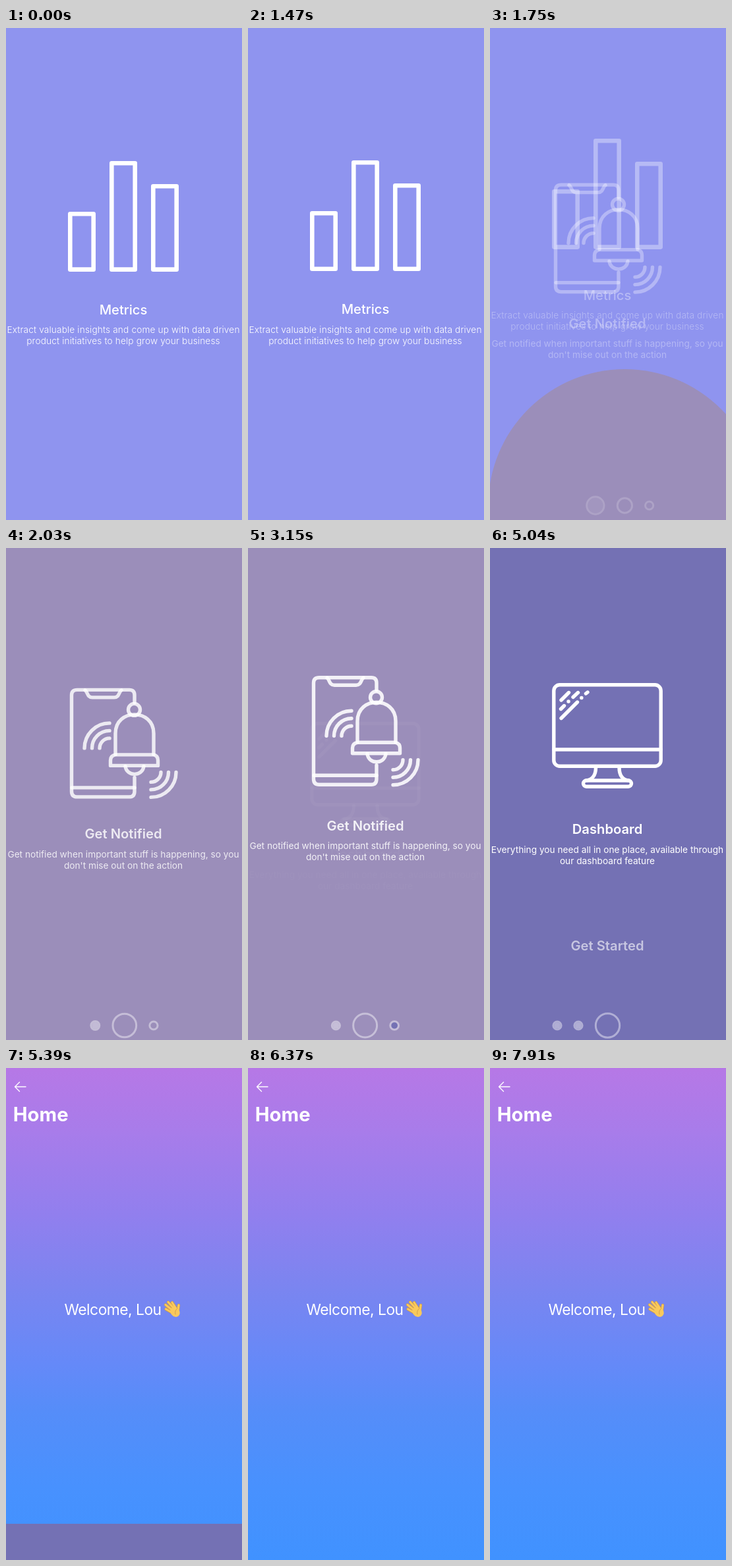
These frames come from a looping animation (358 by 747 pixels, 8000 ms). An HTML page with a canvas:

```html
<!DOCTYPE html>
<html lang="en">
<head>
<meta charset="utf-8">
<title>Onboarding</title>
<style>
html, body { margin: 0; width: 100%; height: 100%; overflow: hidden; background: #8f94ef; }
canvas { display: block; width: 100vw; height: 100vh; }
</style>
</head>
<body>
<canvas id="stage"></canvas>
<script>
const W = 358, H = 747, LOOP = 8000, CX = 178;
const canvas = document.getElementById('stage');
const ctx = canvas.getContext('2d');
const dpr = window.devicePixelRatio || 1;
canvas.width = W * dpr;
canvas.height = H * dpr;

const clamp = v => Math.max(0, Math.min(1, v));
const easeOut = u => 1 - Math.pow(1 - clamp(u), 1.68);
const smooth = u => { u = clamp(u); return u * u * (3 - 2 * u); };

const ENTER = 850, FADE_IN = 650, EXIT = 425, FILL = 500, SLIDE = 620;
const BUTTON_PRESS = 5040, DISMISS = 5145;

const pages = [
  { start: -780, bg: '#8f94ef', icon: drawBars, title: 'Metrics', titleWeight: 500, bodyWeight: 300, spacing: '0.13px',
    body: ['Extract valuable insights and come up with data driven', 'product initiatives to help grow your business'] },
  { start: 1475, bg: '#9b8eba', icon: drawPhone, title: 'Get Notified', titleWeight: 600, bodyWeight: 400, spacing: '0px',
    body: ['Get notified when important stuff is happening, so you', "don't mise out on the action"] },
  { start: 3100, bg: '#7471b4', icon: drawMonitor, title: 'Dashboard', titleWeight: 600, bodyWeight: 400, spacing: '0px',
    body: ['Everything you need all in one place, available through', 'our dashboard feature'] }
];

function text(str, x, y, size, weight, align = 'center', spacing = '0px') {
  ctx.font = `${weight} ${size}px Inter, Roboto, sans-serif`;
  ctx.letterSpacing = spacing;
  ctx.textAlign = align;
  ctx.fillStyle = '#fff';
  ctx.fillText(str, x, y);
}

function pen(width, color = '#fff') {
  ctx.strokeStyle = color;
  ctx.lineWidth = width;
  ctx.lineCap = ctx.lineJoin = 'round';
}

const path = d => ctx.stroke(new Path2D(d));

function circle(x, y, r) {
  ctx.beginPath();
  ctx.arc(x, y, r, 0, Math.PI * 2);
}

function box(x, y, w, h, r) {
  ctx.beginPath();
  ctx.roundRect(x, y, w, h, r);
  ctx.stroke();
}

function drawBars() {
  pen(6.6);
  [[94, 278], [157, 201], [220, 236]].forEach(([x, top]) =>
    ctx.strokeRect(x + 3.3, top + 3.3, 35.4, 369 - top - 6.6));
}

function waves(x, y, from) {
  [38, 26.5, 15].forEach(r => {
    ctx.beginPath();
    ctx.arc(x, y, r, from, from + Math.PI / 2);
    ctx.stroke();
  });
}

function drawPhone() {
  ctx.translate(0, 8.5);
  pen(5.4);
  path('M195 215V204Q195 196 187 196H108Q99.500 196 99.500 204V350Q99.500 358.500 108 358.500H187Q195 358.500 195 350V329');
  path('M100 344.500H195');
  path('M120 196.500C124 199 123 207.500 131 207.500H164C172 207.500 171 199 175 196.500');
  waves(157, 284.5, Math.PI);
  waves(220, 321, 0);
  circle(194.5, 226, 9);
  ctx.stroke();
  path('M166 294V262C166 224 224 224 224 262V294');
  path('M166 294.500H224Q230.500 296 230.500 303V311H158.500V303Q158.500 296 166 294.500Z');
  path('M181 312C183 328 207 328 209 312');
}

function drawMonitor() {
  ctx.translate(0, -12);
  pen(5.4);
  box(96.8, 219.8, 162.4, 123.4, 9);
  path('M97 318H259');
  path('M160.500 345C160.500 357 155 364 146 365M196 345C196 357 201 364 210 365');
  box(141.5, 365, 73, 9.2, 4.6);
  path('M108 243L119.500 231.500M107.500 256.500L112.500 251.500M119 245h.1M126 238.500L133.500 231.500');
  path('M108 270.500L132.500 246M138.800 239.500h.1M145.500 233L148 231');
}

function drawPage(p, t, next) {
  const enter = easeOut((t - p.start) / ENTER);
  const leaving = next ? clamp((t - next.start) / EXIT) : 0;
  const alpha = Math.pow(clamp((t - p.start) / FADE_IN), 1.3) * (1 - leaving);
  if (alpha <= 0) return;
  const dy = 65 * (1 - enter) - 40 * easeOut(leaving);
  ctx.save();
  ctx.globalAlpha = alpha;
  ctx.save();
  ctx.translate(0, dy);
  p.icon();
  ctx.restore();
  ctx.translate(0, dy * 0.65);
  text(p.title, CX, 434.3, 20.2, p.titleWeight);
  p.body.forEach((line, i) => text(line, CX, 462.5 + i * 17, 13.7, p.bodyWeight, 'center', p.spacing));
  ctx.restore();
}

// Pager: the active item grows to a large ring and stays centred.
function pagerLayout(pos) {
  const active = pages.map((_, i) => Math.max(0, 1 - Math.abs(i - pos)));
  const xs = [0];
  for (let i = 1; i < pages.length; i++) xs[i] = xs[i - 1] + 32 + 12.5 * (active[i - 1] + active[i]);
  const centre = xs.reduce((sum, x, i) => sum + x * active[i], 0);
  return xs.map((x, i) => ({ x: 178.5 + x - centre, a: active[i] }));
}

function drawPager(pos, items) {
  ctx.save();
  items.forEach(({ x, a }, i) => {
    ctx.globalAlpha = 0.43 * clamp(pos);
    pen(3);
    circle(x, 725, 6.1 + 12.1 * a);
    ctx.stroke();
    ctx.globalAlpha *= clamp(pos - i);
    ctx.fillStyle = '#fff';
    circle(x, 725, 4.6 + 12.1 * a);
    ctx.fill();
  });
  ctx.restore();
}

function drawOnboarding(t) {
  const pos = smooth((t - pages[1].start) / SLIDE) + smooth((t - pages[2].start) / SLIDE);
  const items = pagerLayout(pos);
  const fills = pages.map((p, i) => i ? clamp((t - p.start) / FILL) : 1);
  ctx.fillStyle = pages[fills.lastIndexOf(1)].bg;
  ctx.fillRect(0, 0, W, H);
  fills.forEach((u, i) => {
    if (u <= 0 || u >= 1) return;
    ctx.fillStyle = pages[i].bg;
    circle(items[i].x, 725, 765 * Math.pow(u, 2.2));
    ctx.fill();
  });
  pages.forEach((p, i) => drawPage(p, t, pages[i + 1]));
  drawPager(pos, items);

  const shown = clamp((t - 3180) / 300);
  if (shown > 0) {
    ctx.save();
    ctx.globalAlpha = shown * (t >= BUTTON_PRESS ? 0.6 : 1);
    text('Get Started', CX, 611, 20.2, 600);
    ctx.restore();
  }
}

function drawHand() {
  const fingers = 'M253 372L242.500 366M254 369L242 359.500M256.500 367L246 355.500M258.500 366L252 356M260.500 371L262 360';
  ctx.fillStyle = '#f9c95c';
  pen(4.4, '#c9964a');
  path(fingers);
  ctx.beginPath();
  ctx.ellipse(256.5, 370.5, 6.6, 8, -0.7, 0, Math.PI * 2);
  ctx.fill();
  pen(3.1, '#f9c95c');
  path(fingers);
  pen(0.8, '#c9964a');
  path('M260 365Q255.500 368 257 374');
}

function drawHome() {
  const g = ctx.createLinearGradient(0, 0, 0, H);
  ['#b678e6', '#a87cea', '#917fee', '#7a85f0', '#6589f8', '#558df9', '#4891fe', '#4092ff']
    .forEach((c, i) => g.addColorStop([0, 0.13, 0.3, 0.45, 0.6, 0.7, 0.85, 1][i], c));
  ctx.fillStyle = g;
  ctx.fillRect(0, 0, W, H);
  pen(1.4);
  path('M30 28.500H13.500M20.500 21.500L13.500 28.500L20.500 35.500');
  text('Home', 10.8, 80.5, 29.2, 700, 'left');
  text('Welcome, Lou', 88.5, 375.2, 22.8, 400, 'left', '-0.5px');
  drawHand();
}

function frame(now) {
  const t = now % LOOP;
  ctx.setTransform(dpr, 0, 0, dpr, 0, 0);
  if (t < DISMISS) {
    drawOnboarding(t);
  } else {
    // The onboarding sheet drops away on a critically damped spring.
    drawHome();
    const s = 17.4 * (t - DISMISS) / 1000;
    const y = Math.round(H * (1 - (1 + s) * Math.exp(-s)));
    if (t < 5670) {
      ctx.translate(0, y);
      drawOnboarding(t);
    }
  }
  requestAnimationFrame(frame);
}
requestAnimationFrame(frame);
</script>
</body>
</html>
```
